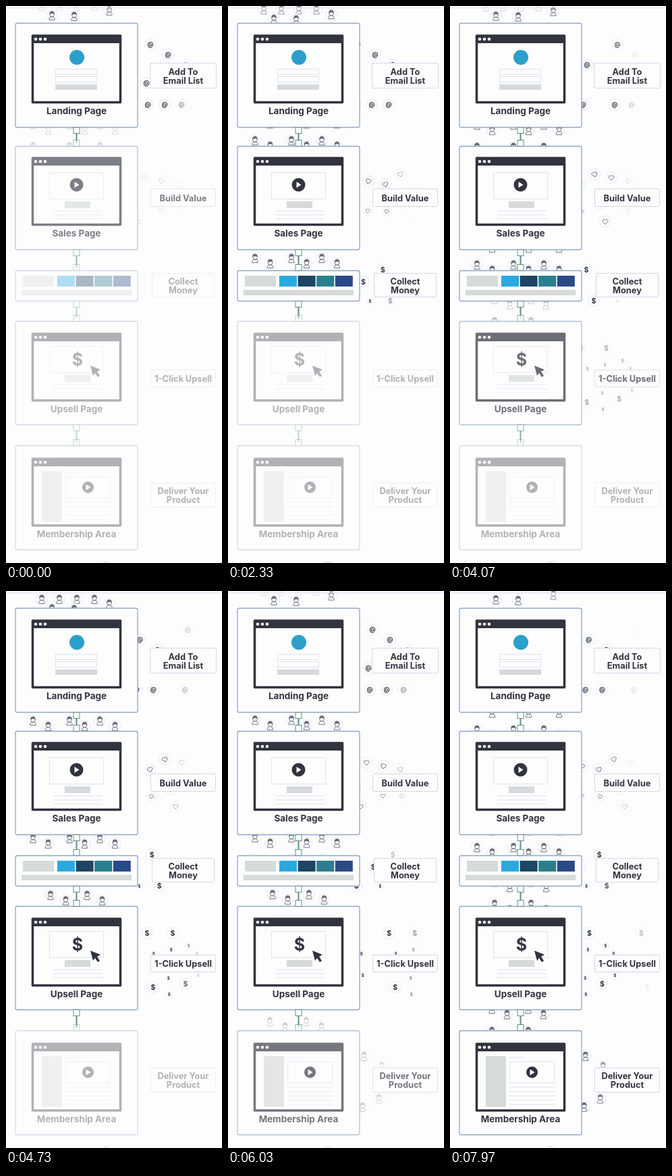
Animation, 320 px wide and 824 px high, one loop 8000 ms. Source, as an HTML page:

```html
<!DOCTYPE html>
<html lang="en">
<head>
<meta charset="utf-8">
<title>Sales funnel</title>
<style>
  html, body { margin: 0; height: 100%; overflow: hidden; background: #fdfdfe; }
  svg { display: block; width: 100vw; height: 100vh; }
  text { font-family: Inter, "Open Sans", sans-serif; font-weight: 700; text-anchor: middle; fill: #31343e; }
</style>
</head>
<body>
<svg id="stage" viewBox="0 0 320 824">
  <defs>
    <g id="halo"><circle r="8.5" fill="#fdfdfe" stroke="#e9eaf4"/></g>
    <g id="at"><use href="#halo"/><text y="3" font-size="9">@</text></g>
    <g id="dollar"><use href="#halo"/><text y="3.8" font-size="10.5">$</text></g>
    <g id="heart"><use href="#halo"/>
      <path d="M0 4L-3.6 .2C-5-2.6-1.5-4.6 0-2C1.5-4.6 5-2.6 3.6 .2Z" fill="#fdfdfe" stroke="#676c7a" stroke-width=".9"/></g>
    <g id="person"><use href="#halo"/>
      <g fill="#fdfdfe" stroke="#676c7a" stroke-width=".9"><path d="M-4 6.5V4Q-4 2 0 2T4 4V6.5Z"/><circle cy="-1.5" r="3.4"/></g>
      <path d="M-3.8-1.5Q-4-6.5 0-6.5T3.8-1.5Q1-4-3.8-1.5" fill="#676c7a"/></g>
  </defs>
</svg>
<script>
const LOOP = 8000, STAGE_GAP = 2000, FADE = 500, DIM = 0.37;
const BG = '#fdfdfe', DARK = '#31343e', BORDER = '#92a6c4', LINK = '#5f9080', PALE = '#d6dadb', FAINT = '#dfe2ef';
const stage = document.getElementById('stage');

const mod = (a, n) => ((a % n) + n) % n;
const clamp = v => Math.max(0, Math.min(1, v));
const times = (n, make) => Array.from({ length: n }, (_, i) => make(i));

const rect = (x1, y1, x2, y2, fill, extra = '') =>
  `<rect x="${x1}" y="${y1}" width="${x2 - x1}" height="${y2 - y1}" fill="${fill}" ${extra}/>`;
const outline = (x1, y1, x2, y2, color = FAINT, extra = '') =>
  rect(x1 + .5, y1 + .5, x2 - .5, y2 - .5, BG, `stroke="${color}" ${extra}`);
const text = (x, y, size, words) =>
  `<text x="${x}" y="${y + size * .36}" font-size="${size}">${words}</text>`;
const rules = (x1, x2, y, step, n) =>
  times(n, i => rect(x1, y + i * step - .5, x2, y + i * step + .5, FAINT)).join('');
const knob = y => outline(99.5, y - 5, 109.5, y + 5, LINK);
const play = (x, y, r) => `<circle cx="${x}" cy="${y}" r="${r}" fill="${DARK}"/>
  <path d="M${x - 3} ${y - 4.5}v9l7-4.5z" fill="${BG}"/>`;

function browser(top, title, content) {
  const bottom = top + 102;
  const dots = times(3, i => `<circle cx="${44 + i * 7}" cy="${top + 7}" r="2.3" fill="${BG}"/>`).join('');
  return rect(39.5, top + 2, 169.5, bottom - 1.5, BG, `stroke="${DARK}" stroke-width="3.5" stroke-linejoin="round"`)
    + rect(38.5, top + 1, 170.5, top + 13, DARK) + dots + content + text(104.5, bottom + 11.5, 13.5, title);
}

const form = '<circle cx="105" cy="76" r="11" fill="#2c9fcb"/>'
  + outline(73, 93, 135, 102) + outline(73, 104, 135, 113) + rect(73, 116, 135, 124, PALE);
const pitch = top => outline(64, top, 145, top + 40) + rect(87, top + 43, 125, top + 53, PALE)
  + rules(70, 143, top + 57, 6, 3);
const payment = rect(25, 399, 71, 415, PALE) + rect(23, 420, 186, 428, PALE)
  + ['#2ba9df', '#1f4565', '#2a7f8e', '#294a86'].map((c, i) => rect(76 + i * 27.6, 399, 102 + i * 27.6, 415, c)).join('');
const cursor = `<path d="M125 532l15 6-5 3 4 6-3 2-4-6-3 4z" fill="${DARK}"/>`;
const lessons = rect(53, 688, 83, 763, PALE) + outline(88, 696, 155, 728) + play(121.5, 712, 8.5)
  + rules(88, 112, 690, 0, 1) + rules(88, 155, 734, 6.5, 5);

// Evenly spaced particles, placed where they stand at time zero.
const row = (x, y, dx, dy, n, scale = 1) => times(n, i => ({ x: x + dx * i, y: y + dy * i, scale }));

// Visitors between two cards: a zigzag that leaves room for the connector, in two waves.
const WAVE = 33;
const crowd = (x, y, n) => ({
  speed: .0245, from: y - 7, travel: 2 * WAVE,
  items: times(2 * n, k => {
    const i = k % n, wave = k < n ? 0 : WAVE;
    return { x: x + 22.5 * i + (i > 1 ? 9 : 0), y: y + 8 * (i % 2) + wave, scale: 1 };
  })
});

const sections = [
  { top: 25, bottom: 180, content: browser(42, 'Landing Page', form),
    label: [213, 84, 312, 122], words: ['Add To', 'Email List'],
    out: { icon: 'at', speed: .0322, from: 185, travel: 97,
      items: [...row(214, 57, 26, 15, 3), ...row(210, 146, 25, 0, 3), ...row(208, 114, 0, 0, 1)] },
    down: { speed: .0168, from: -2, travel: 33.8, appear: 10,
      items: [...row(53, 0, 26, 0, 4), ...row(68, 14, 33, 1, 2), ...row(153, 7, 0, 0, 1)] } },
  { top: 207, bottom: 361, content: browser(223, 'Sales Page', pitch(246) + play(104.5, 264.5, 10)),
    label: [214, 270, 311, 297], words: ['Build Value'],
    out: { icon: 'heart', speed: .0322, from: 180, travel: 97,
      items: [...row(180, 249, 25, 5, 4), ...row(229, 303, 28, 1, 2, .8), ...row(188, 293, 8, 26, 2)] },
    down: crowd(40, 175, 6) },
  { top: 391, bottom: 437, content: payment,
    label: [216, 395, 309, 431], words: ['Collect', 'Money'],
    out: { icon: 'dollar', speed: .0216, from: 189, travel: 65,
      items: [...row(244, 390, -29, 18, 2), ...row(190, 436, 0, 0, 1), ...row(225, 437, 0, 0, 1, .6)] },
    down: crowd(40, 349, 6) },
  { top: 466, bottom: 620, content: browser(483, 'Upsell Page', pitch(503) + text(106, 523, 25, '$') + cursor),
    label: [214, 538, 311, 564], words: ['1-Click Upsell'],
    out: { icon: 'dollar', speed: .023, from: 186, travel: 115,
      items: [...row(215, 506, 38, 0, 2), ...row(224, 586, 48, -5, 2), ...row(225, 537, 26, -6, 3, .6),
        ...row(247, 573, 44, -4, 2, .6), ...row(289, 537, -41, 60, 2, .6)] },
    down: crowd(66, 433, 4) },
  { top: 650, bottom: 805, content: browser(668, 'Membership Area', lessons),
    label: [214, 705, 311, 742], words: ['Deliver Your', 'Product'],
    out: { icon: 'person', speed: .0255, from: 190, travel: 50.4,
      items: [...row(199, 688, 26, 15, 2), ...row(197, 763, 24, -12, 2)] },
    down: crowd(62, 621, 4) }
];

function sectionMarkup({ top, bottom, content, label, words }, i) {
  const [x1, y1, x2, y2] = label;
  const middle = (y1 + y2) / 2 + .5;
  const lines = words.map((w, n) => text((x1 + x2) / 2, middle + (n - (words.length - 1) / 2) * 12.8, 12.8, w)).join('');
  const next = sections[i + 1];
  const link = next ? rect(103.5, bottom + 4, 105.5, next.top - 4, LINK) + knob(bottom + 4) : '';
  return rect(14, top, 195, bottom, BG, 'rx="2"') + rect(x1, y1, x2, y2, BG)
    + `<g class="section">${outline(13.5, top, 195.5, bottom, BORDER, 'rx="2.5" stroke-width="1.3"')}${content}`
    + outline(x1, y1, x2, y2, '#c6cbe2', 'rx="1.5" stroke-dasharray="3 1"') + lines
    + link + (i ? knob(top - 4) : '') + '</g>';
}

const flowMarkup = (flow, icon) => flow.items.map(() => `<use href="#${icon}"/>`).join('');

stage.insertAdjacentHTML('beforeend',
  sections.map(s => `<g class="flow">${flowMarkup(s.out, s.out.icon)}${flowMarkup(s.down, 'person')}</g>`).join('')
  + sections.map(sectionMarkup).join('')
  + rect(0, 2, 320, 3.5, '#e6e7f2') + rect(144, 821.5, 153, 823, FAINT));

const flowGroups = [...stage.querySelectorAll('.flow')];
const sectionGroups = [...stage.querySelectorAll('.section')];

function moveFlow({ items, icon, speed, from, travel, appear }, nodes, t, axis) {
  items.forEach((item, i) => {
    const done = mod(item[axis] - from + speed * t, travel);
    const { x, y } = { ...item, [axis]: from + done };
    const tilt = icon === 'heart' ? (i % 3 - 1) * 18 : 0;
    const leaving = axis === 'x' ? clamp((.95 - done / travel) / .35) : 1;
    const arriving = appear ? clamp(done / appear) : 1;
    nodes[i].setAttribute('transform', `translate(${x} ${y}) rotate(${tilt}) scale(${item.scale})`);
    nodes[i].setAttribute('opacity', leaving * arriving);
  });
}

function draw(now) {
  const t = now % LOOP;
  sections.forEach(({ out, down }, i) => {
    const lit = clamp((t - STAGE_GAP * (i - 1) + 200) / FADE);
    const nodes = [...flowGroups[i].children];
    sectionGroups[i].setAttribute('opacity', DIM + (1 - DIM) * lit);
    flowGroups[i].setAttribute('opacity', lit ** 1.5);
    moveFlow(out, nodes, t, 'x');
    moveFlow(down, nodes.slice(out.items.length), t, 'y');
  });
}

const begin = performance.now();
function tick() {
  draw(performance.now() - begin);
  requestAnimationFrame(tick);
}
tick();
</script>
</body>
</html>
```
